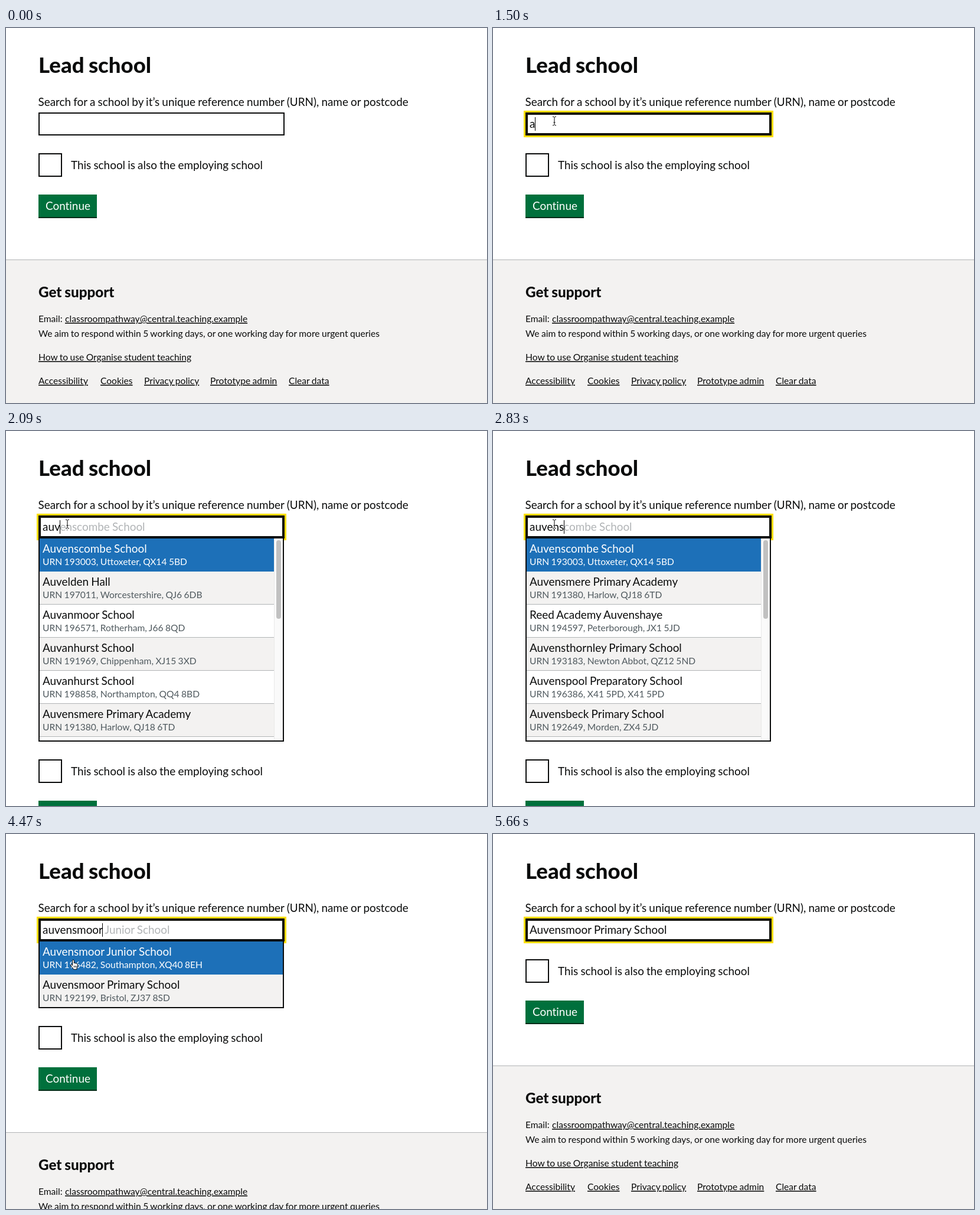
Write an HTML page that moves like this. It is 815x635 px and loops after 6110 ms.

```html
<!DOCTYPE html>
<html lang="en">
<head>
<meta charset="utf-8">
<title>Lead school</title>
<style>
  html, body { margin: 0; width: 100%; height: 100%; overflow: hidden; background: #fff; }
  svg { display: block; width: 815px; height: 635px; }
  text {
    font: 18.9px Lato, sans-serif; fill: #0b0c0c; white-space: pre;
    word-spacing: -.035em; font-variant-ligatures: none;
  }
  .title { font-size: 36.6px; font-weight: 800; }
  .heading { font-size: 24.2px; font-weight: 800; }
  .small, .link { font-size: 15.6px; }
  .link { text-decoration: underline 1px; text-underline-offset: 2px; }
  .muted { fill: #505a5f; }
  .white { fill: #fff; }
  .hint { fill: #b1b4b6; }
</style>
</head>
<body>
<svg id="stage" viewBox="0 0 815 635"></svg>
<script>
const LOOP = 6110;
const INK = '#0b0c0c', GREY = '#f3f2f1', LINE = '#b1b4b6', BLUE = '#1d70b8';
const stage = document.getElementById('stage');
const ruler = document.createElement('canvas').getContext('2d');

// Each school: name, then reference, town and postcode.
const combe = ['Auvenscombe School', 'URN 193003, Uttoxeter, QX14 5BD'];
const mere = ['Auvensmere Primary Academy', 'URN 191380, Harlow, QJ18 6TD'];
const junior = ['Auvensmoor Junior School', 'URN 196482, Southampton, XQ40 8EH'];
const primary = ['Auvensmoor Primary School', 'URN 192199, Bristol, ZJ37 8SD'];

const menuAu = [
  combe,
  ['Aunderby Hall School', 'URN 197244, Stratford upon Avon, QV7 3LD'],
  ['Aulmstead Primary School', 'URN 194816, Nottingham, XJ5 2RD'],
  ['Auvelden Hall', 'URN 197011, Worcestershire, QJ6 6DB'],
  ['Aukerton Academy', 'URN 198350, Lincoln, ZQ6 4HD'],
  ['Auvanmoor School', 'URN 196571, Rotherham, J66 8QD'],
];
const menuAuv = [
  combe,
  ['Auvelden Hall', 'URN 197011, Worcestershire, QJ6 6DB'],
  ['Auvanmoor School', 'URN 196571, Rotherham, J66 8QD'],
  ['Auvanhurst School', 'URN 191969, Chippenham, XJ15 3XD'],
  ['Auvanhurst School', 'URN 198858, Northampton, QQ4 8BD'],
  mere,
];
const menuAuve = [
  combe,
  mere,
  ['Reed Academy Auvenshaye', 'URN 194597, Peterborough, JX1 5JD'],
  ['Auvensthornley Primary School', 'URN 193183, Newton Abbot, QZ12 5ND'],
  ['Auvenspool Preparatory School', 'URN 196386, X41 5PD, X41 5PD'],
  ['Auvensbeck Primary School', 'URN 192649, Morden, ZX4 5JD'],
];

// Step tables: start time in ms, then the value from that time on.
const focusSteps = [[0, false], [1050, true]];
const queries = [
  [0, ''], [1500, 'a'], [1790, 'au'], [2090, 'auv'], [2230, 'auve'], [2530, 'auven'],
  [2830, 'auvens'], [3130, 'auvensm'], [3270, 'auvensmo'], [3420, 'auvensmoor'],
  [5060, primary[0]],
];
const menus = [
  [0, []], [1790, menuAu], [2090, menuAuv], [2230, menuAuve],
  [3130, [mere, junior, primary]], [3270, [junior, primary]], [5060, []],
];
const selections = [[0, 0], [4620, 1]];
const carets = [[0, false], [1050, true], [4020, false], [4470, true], [4920, false], [5060, true], [5660, false]];
const pointers = [
  [0, null], [450, ['arrow', 19, 183]], [600, ['beam', 87, 154]], [750, ['beam', 100, 149]],
  [4470, ['hand', 108, 212]], [4620, ['hand', 115, 252]], [4770, ['hand', 120, 258]],
  [4920, ['hand', 122, 257]], [5210, ['arrow', 125, 257]], [5360, ['arrow', 342, 350]],
  [5510, ['arrow', 583, 552]], [5660, null],
];
const valueAt = (steps, time) => steps.filter(step => step[0] <= time).pop()[1];

const rect = (x, y, w, h, fill, extra = '') =>
  `<rect x="${x}" y="${y}" width="${w}" height="${h}" fill="${fill}" ${extra}/>`;
const text = (x, y, content, style = '') => `<text x="${x}" y="${y}" class="${style}">${content}</text>`;
const box = (x, y, w, h, border) =>
  rect(x, y, w, h, INK) + rect(x + border, y + border, w - 2 * border, h - 2 * border, '#fff');

const shapes = {
  arrow: '<path d="M1 1V15.2L4.3 12.2 6.8 17.3 9.2 16.2 6.8 11.3H11.4Z" fill="#000" stroke="#fff"/>',
  beam: ['#fff" stroke-width="2.6', '#000'].map(stroke =>
    `<path d="M1 1Q3.5 1 4 2.5Q4.5 1 7 1M4 2.5V14.5M1 16Q3.5 16 4 14.5Q4.5 16 7 16M2.5 11H5.5" fill="none" stroke="${stroke}"/>`).join(''),
  hand: '<path d="M4.5 10.5V2.5a1.4 1.4 0 0 1 2.8 0V7a1.3 1.3 0 0 1 2.4.3 1.2 1.2 0 0 1 2.2.6q1.6 0 1.6 1.6V12l-1.5 3.2v2H6.3L5 14.8 1.6 11q-.8-1.6.8-1.7z" fill="#fff" stroke="#000"/>' +
    '<path d="M7.3 11v3M9.3 11v3M11.2 11v3" stroke="#000" stroke-width=".8"/>',
};

function drawField(query, menu, focused, caret) {
  const hint = menu.length ? menu[0][0].slice(query.length) : '';
  ruler.font = '18.9px Lato, sans-serif';
  ruler.wordSpacing = '-.66px';
  const caretX = Math.floor(62 + ruler.measureText(query).width);
  return (focused ? rect(52, 140, 423, 45, '#fd0') : '') +
    box(55, 143, 417, 39, focused ? 4 : 2) +
    text(62, 169, `${query}<tspan class="hint">${hint}</tspan>`) +
    (caret ? rect(caretX, 151, 1, 23, '#000') : '');
}

function drawRow([name, details], index, selected, width, last) {
  const y = 182 + 56 * index;
  const active = index === selected;
  const fill = active ? BLUE : index % 2 ? GREY : '#fff';
  return rect(57, y, width, last ? 55 : 56, fill) +
    (active || last ? '' : rect(57, y + 55, width, 1, LINE)) +
    text(62, y + 24, name, active ? 'white' : '') +
    text(62, y + 45, details, active ? 'small white' : 'small muted');
}

const menuHeight = menu => menu.length > 5 ? 344 : menu.length ? 56 * menu.length + 1 : 0;

function drawMenu(menu, selected) {
  if (!menu.length) return '';
  const scrolls = menu.length > 5;
  const height = menuHeight(menu);
  const rows = menu.map((school, i) =>
    drawRow(school, i, selected, scrolls ? 397 : 412, !scrolls && i === menu.length - 1));
  const scrollbar = rect(454, 182, 15, 342, '#fafafa') + rect(454, 182, 1, 342, '#e8e8e8') +
    rect(458, 185, 8, 133, '#c1c1c1', 'rx="4"');
  return rect(55, 182, 416, height, INK) + rect(57, 182, 412, height - 2, '#fff') +
    rows.join('') + (scrolls ? scrollbar : '');
}

const heading = text(55, 76, 'Lead school', 'title') +
  text(54.5, 132, 'Search for a school by it’s unique reference number (URN), name or postcode');

const lowerPage = box(55, 212, 40, 40, 2) +
  text(110, 239, 'This school is also the employing school') +
  rect(55, 282, 99, 40, '#002d18') + rect(55, 282, 99, 38, '#00703c') +
  text(67, 308, 'Continue', 'white') +
  rect(0, 392, 815, 635, GREY) + rect(0, 392, 815, 1, LINE) +
  text(55, 456, 'Get support', 'heading') +
  text(55, 498, 'Email:', 'small') +
  text(100, 498, 'classroompathway@central.teaching.example', 'link') +
  text(55, 523, 'We aim to respond within 5 working days, or one working day for more urgent queries', 'small') +
  text(55, 563, 'How to use Organise student teaching', 'link') +
  [[55, 'Accessibility'], [160, 'Cookies'], [234, 'Privacy policy'], [346, 'Prototype admin'], [479, 'Clear data']]
    .map(([x, label]) => text(x, 603, label, 'link')).join('');

function scene(time) {
  const menu = valueAt(menus, time);
  const pointer = valueAt(pointers, time);
  return heading +
    `<g transform="translate(0 ${menuHeight(menu)})">${lowerPage}</g>` +
    drawField(valueAt(queries, time), menu, valueAt(focusSteps, time), valueAt(carets, time)) +
    drawMenu(menu, valueAt(selections, time)) +
    (pointer ? `<g transform="translate(${pointer[1]} ${pointer[2]})">${shapes[pointer[0]]}</g>` : '');
}

let start, shown;
function frame(now) {
  start ??= now;
  const markup = scene((now - start) % LOOP);
  if (markup !== shown) stage.innerHTML = shown = markup;
  requestAnimationFrame(frame);
}
requestAnimationFrame(frame);
</script>
</body>
</html>
```
